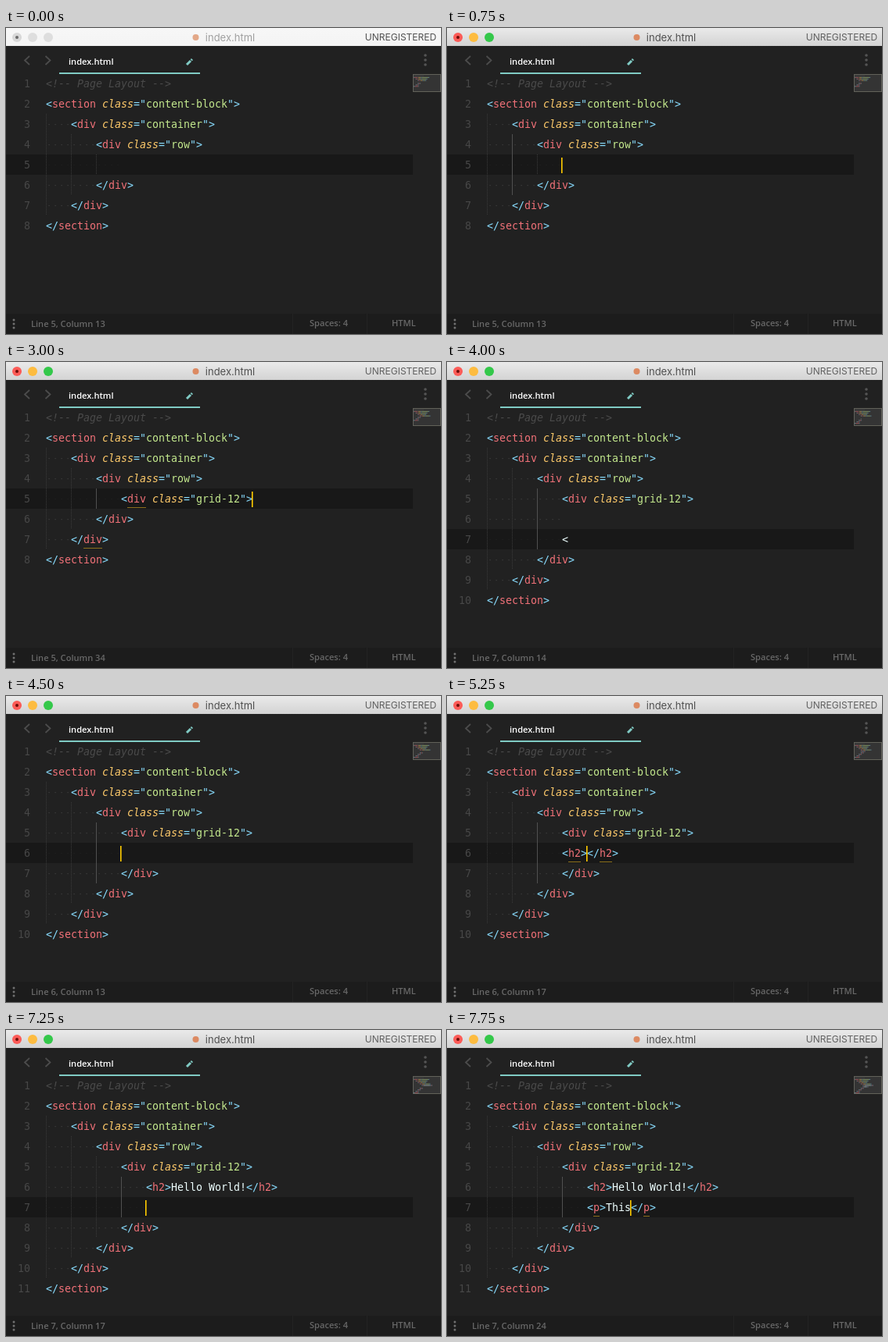
An HTML page with a canvas that plays this animation: 556 by 392 pixels, repeating every 8 s.

```html
<!DOCTYPE html>
<html lang="en">
<head>
<meta charset="utf-8">
<title>Editor</title>
<style>
  html, body { margin: 0; width: 100%; height: 100%; overflow: hidden; background: #212121; }
  canvas { display: block; width: 556px; height: 392px; }
</style>
</head>
<body>
<canvas id="stage"></canvas>
<script>
const W = 556, H = 392, LOOP = 8000;
const LEFT = 51, TOP = 58, ROW = 26, CHAR = 8;
const MONO = '13.29px "DejaVu Sans Mono", monospace';
const UI = '600 11.1px "Open Sans", sans-serif';
const TITLE = 'Inter, sans-serif';

const canvas = document.getElementById('stage');
const ctx = canvas.getContext('2d');
const dpr = window.devicePixelRatio || 1;
canvas.width = W * dpr;
canvas.height = H * dpr;

const pad = (n, text = '') => ' '.repeat(n) + text;

const HEAD = [
  '<!-- Page Layout -->',
  '<section class="content-block">',
  pad(4, '<div class="container">'),
  pad(8, '<div class="row">')
];
const TAIL = [pad(8, '</div>'), pad(4, '</div>'), '</section>'];

const GRID = pad(12, '<div class="grid-12">');
const END = pad(12, '</div>');
const HELLO = pad(16, '<h2>Hello World!</h2>');
const open5 = [[5, 13, 3], [7, 6, 3]];
const h2 = n => [[6, 13, 2], [6, 18 + n, 2]];
const heading = text => [GRID, pad(12, `<h2>${text}</h2>`), END];
const inRow = [8, 5, 7];

// at, inserted lines, caret line, caret column, marked tags, active guide [col, from, to], caret alpha
const STEPS = [
  [0, [pad(12)], 5, 13, [], null, 0],
  [250, [pad(12)], 5, 13, [], [4, 4, 6], 0.35],
  [500, [pad(12)], 5, 13, [], [4, 4, 6], 0.7],
  [750, [pad(12)], 5, 13, [], [4, 4, 6], 1],
  [1000, [pad(12)], 5, 13, [], [4, 4, 6], 0.5],
  [1250, [pad(12, '<')], 5, 14, [], [8, 5, 5], 1],
  [1500, [pad(12, '<div')], 5, 17, open5, [8, 5, 5], 1],
  [2000, [pad(12, '<div class=')], 5, 24, open5, [8, 5, 5], 1],
  [2250, [pad(12, '<div class="grid"')], 5, 29, open5, [8, 5, 5], 1],
  [2750, [pad(12, '<div class="grid-12"')], 5, 32, open5, [8, 5, 5], 1],
  [3000, [GRID], 5, 34, open5, [8, 5, 5], 1],
  [3250, [GRID, pad(12)], 6, 13, [], [8, 5, 6], 1],
  [3500, [GRID, pad(12), pad(12)], 7, 13, [], inRow, 1],
  [4000, [GRID, pad(12), pad(12, '<')], 7, 14, [], inRow, 0],
  [4250, [GRID, pad(12), END], 7, 19, [[5, 13, 3], [7, 14, 3]], inRow, 1],
  [4500, [GRID, pad(12), END], 6, 13, [], inRow, 1],
  [5000, [GRID, pad(12, '<h2'), END], 6, 16, [[6, 13, 2]], inRow, 1],
  [5250, heading(''), 6, 17, h2(0), inRow, 1],
  [5750, heading('Hello'), 6, 22, h2(5), inRow, 1],
  [6250, heading('Hello Wor'), 6, 26, h2(9), inRow, 1],
  [6500, heading('Hello World!'), 6, 29, h2(12), inRow, 1],
  [6750, [GRID, HELLO, END], 6, 33, [[6, 17, 2], [6, 34, 2]], [12, 6, 6], 1],
  [7000, [GRID, HELLO, END], 6, 38, [[6, 17, 2], [6, 34, 2]], [12, 6, 6], 1],
  [7250, [GRID, HELLO, pad(16), END], 7, 17, [], [12, 6, 7], 1],
  [7500, [GRID, HELLO, pad(16, '<p></p>'), END], 7, 20, [[7, 17, 1], [7, 21, 1]], [12, 6, 7], 1],
  [7750, [GRID, HELLO, pad(16, '<p>This</p>'), END], 7, 24, [[7, 17, 1], [7, 25, 1]], [12, 6, 7], 1]
];

// comment, punctuation, tag, attribute, string, space, text
const TOKEN = /(<!--.*)|(<\/?(?=\w)|[>="])|((?<=<\/?)\w+)|(class)|((?<==")[^"]+)|(\s+)|([^<]+|<)/g;
const COLORS = ['#4a4a4a', '#89ddff', '#f07178', '#ffcb6b', '#c3e88d', '', '#eeffff'];

const rowTop = n => TOP + (n - 1) * ROW;
const colX = c => LEFT + c * CHAR;

function rect(x, y, w, h, color) {
  ctx.fillStyle = color;
  ctx.fillRect(x, y, w, h);
}

function dot(x, y, r, color) {
  ctx.fillStyle = color;
  ctx.beginPath();
  ctx.arc(x, y, r, 0, Math.PI * 2);
  ctx.fill();
}

function label(text, x, y, font, color, align = 'left') {
  ctx.font = font;
  ctx.fillStyle = color;
  ctx.textAlign = align;
  ctx.fillText(text, x, y);
}

function stroke(points, color, width) {
  ctx.strokeStyle = color;
  ctx.lineWidth = width;
  ctx.beginPath();
  points.forEach(([x, y]) => ctx.lineTo(x, y));
  ctx.stroke();
}

function tokens(line) {
  return [...line.matchAll(TOKEN)].map(m => ({
    text: m[0], col: m.index, kind: m.slice(1).findIndex(g => g !== undefined)
  })).filter(t => t.kind !== 5);
}

function titleBar(active) {
  const shade = ctx.createLinearGradient(0, 0, 0, 23);
  shade.addColorStop(0, active ? '#eaeaea' : '#f7f7f7');
  shade.addColorStop(1, active ? '#d3d3d3' : '#f4f4f4');
  rect(0, 0, W, 23, shade);
  const lights = active ? ['#fc5b57', '#fdbc40', '#34c84a'] : ['#d8d8d8', '#dedede', '#dedede'];
  lights.forEach((c, i) => dot(14 + i * 20, 12, 6, c));
  dot(14, 12, 2, active ? '#6d0d0a' : '#6a6a6a');
  dot(242.5, 12, 4, active ? '#dc8a62' : '#e3a888');
  label('index.html', 286.5, 17, '13px ' + TITLE, active ? '#505050' : '#a0a0a0', 'center');
  label('UNREGISTERED', 504.5, 16, '12px ' + TITLE, active ? '#606060' : '#505050', 'center');
}

function tabBar() {
  stroke([[30, 36], [24, 41.5], [30, 47]], '#4c4c4c', 1.8);
  stroke([[50.5, 36], [56.5, 41.5], [50.5, 47]], '#4c4c4c', 1.8);
  label('index.html', 80, 47, UI, '#ffffff');
  rect(68, 57, 180, 2, '#80cbc4');
  stroke([[231, 47], [236, 42]], '#80cbc4', 3);
  stroke([[236.7, 41.3], [238, 40]], '#80cbc4', 3);
  [35, 41, 47].forEach(y => dot(536, y, 1.8, '#555555'));
}

function statusBar(line, col) {
  rect(0, 366, W, 26, '#1c1c1c');
  rect(366, 366, 1, 26, '#232323');
  rect(461, 366, 1, 26, '#232323');
  [374, 379, 384].forEach(y => dot(10, y, 1.5, '#707070'));
  label(`Line ${line}, Column ${col}`, 32, 383, UI, '#686868');
  label('Spaces: 4', 388, 382, UI, '#686868');
  label('HTML', 493, 382, UI, '#686868');
}

function minimap(lines) {
  rect(520, 59, 36, 23, '#343434');
  ctx.strokeStyle = '#62625a';
  ctx.lineWidth = 1;
  ctx.strokeRect(520.5, 59.5, 35, 22);
  ctx.globalAlpha = 0.5;
  lines.forEach((line, i) => tokens(line).forEach(t =>
    rect(521 + t.col * 0.65, 61 + i * 1.9, t.text.length * 0.65, 1, COLORS[t.kind])));
  ctx.globalAlpha = 1;
}

function guides(lines, active) {
  lines.forEach((line, i) => {
    const n = i + 1, indent = line.search(/\S|$/);
    for (let c = 0; c < indent; c += 4) {
      const lit = active && c === active[0] && n >= active[1] && n <= active[2];
      if (lit) rect(colX(c), rowTop(n), 1, ROW, '#505050');
      else for (let y = 0; y < ROW; y += 2) rect(colX(c), rowTop(n) + y, 1, 1, '#3a3a3a');
    }
  });
}

function codeLine(line, n, current) {
  const base = rowTop(n) + 18;
  label(n, 31, base, MONO, '#474747', 'right');
  const indent = line.search(/\S|$/);
  for (let c = 0; c < indent; c++) {
    rect(colX(c) + 3.5, base - 5, 1.2, 1.2, current ? '#222222' : '#414141');
  }
  tokens(line).forEach(t => {
    const slant = t.kind === 0 || t.kind === 3 ? 'italic ' : '';
    label(t.text, colX(t.col), base, slant + MONO, COLORS[t.kind]);
  });
}

function draw(time) {
  const t = time % LOOP;
  const step = STEPS.findLast(s => s[0] <= t);
  const [, body, line, col, marks, active, caret] = step;
  const lines = [...HEAD, ...body, ...TAIL];

  ctx.setTransform(dpr, 0, 0, dpr, 0, 0);
  rect(0, 0, W, H, '#212121');
  titleBar(t >= 250);
  tabBar();
  rect(0, rowTop(line), 520, ROW, '#181818');
  guides(lines, active);
  lines.forEach((text, i) => codeLine(text, i + 1, i + 1 === line));
  marks.forEach(([n, c, len]) => rect(colX(c), rowTop(n) + 24, len * CHAR, 1, '#8c701c'));
  ctx.globalAlpha = caret;
  rect(colX(col - 1) - 1, rowTop(line) + 4, 1.6, 20, '#ffcc00');
  ctx.globalAlpha = 1;
  minimap(lines);
  statusBar(line, col);
}

const start = performance.now();
function tick() {
  draw(performance.now() - start);
  requestAnimationFrame(tick);
}
tick();
</script>
</body>
</html>
```
